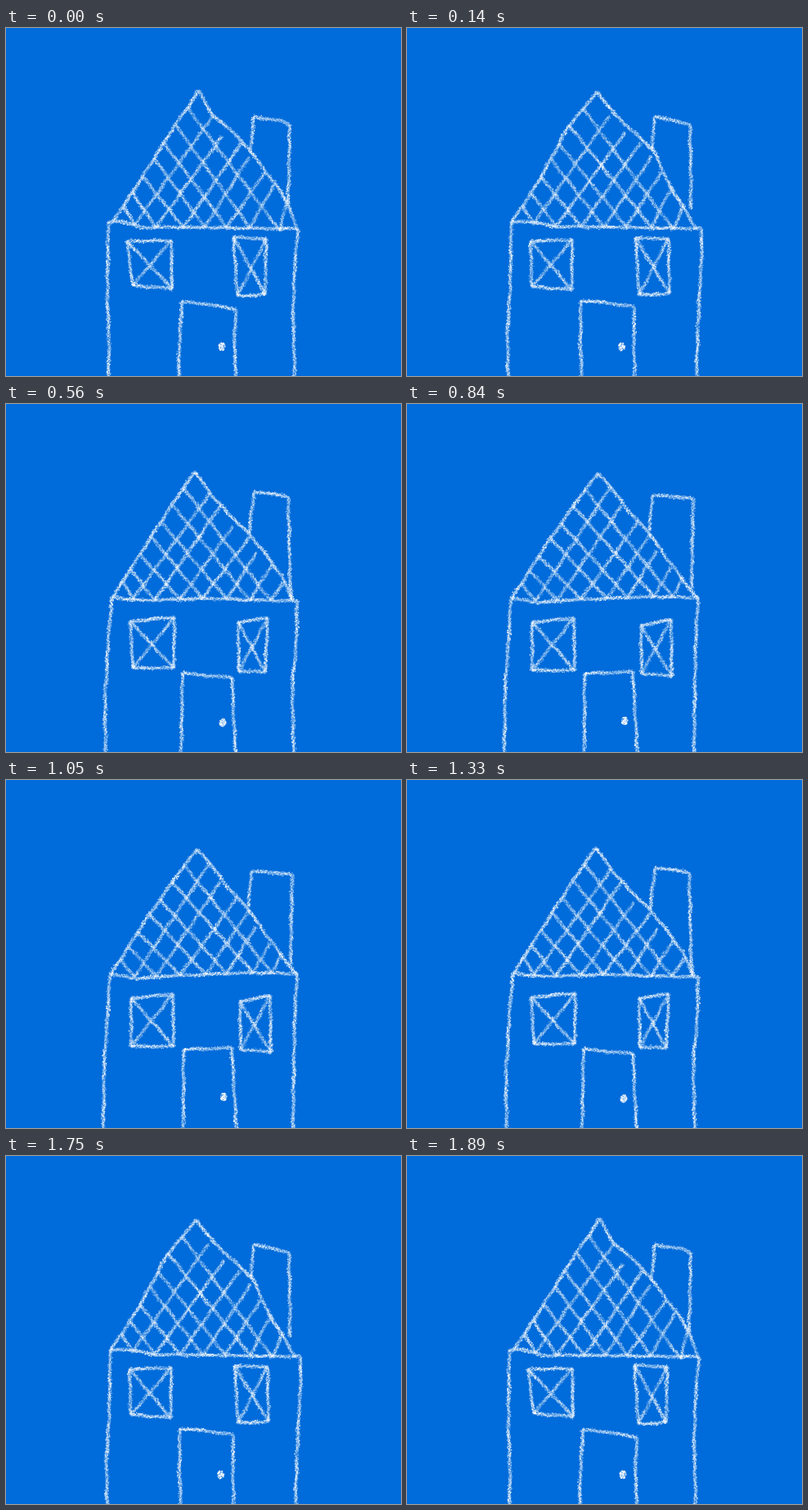
Recreate the animation shown at these times as an HTML page with a canvas. Size 483 by 426 pixels, loop 1960 ms.

```html
<!DOCTYPE html>
<html lang="en">
<head>
<meta charset="utf-8">
<title>Chalk house</title>
<style>
  html, body { margin: 0; width: 100%; height: 100%; overflow: hidden; background: #006bda; }
  canvas { display: block; }
</style>
</head>
<body>
<canvas id="stage" width="483" height="426"></canvas>
<script>
const W = 483, H = 426, STEP = 140, LOOP = 1960, TURN = 1015;

// Four key drawings; each part is a polyline of "x,y" points.
// tips: upper ends of the "/" tile lines; nodes: where tile lines meet the eaves.
const keys = [
  {
    left: '236,77 206,120 160,193 131,236',
    right: '236,77 253,108 270,120 296,147 336,200 345,217 357,248',
    base: '125,238 140,236 165,244 240,244 300,245 356,246',
    wallL: '125,238 124,330 126,380 125,430',
    wallR: '357,247 353,290 351,345 353,430',
    chimney: '299,150 303,109 335,113 347,119 345,215',
    winL: '148,261 202,260 203,319 155,315',
    winR: '278,256 318,258 317,326 283,328',
    door: '211,430 212,390 215,335 245,338 281,344 279,390 282,430',
    knob: '264,390',
    tips: '253,108 264,133 288,141 297,158 316,177 328,192 343,212',
    nodes: '335,248 298,244 270,244 243,244 217,244 183,244 157,241'
  },
  {
    left: '232,81 195,122 160,183 128,238',
    right: '232,82 254,99 267,115 303,155 318,180 333,210 353,242',
    base: '127,238 160,239 180,240 240,243 300,244 361,244',
    wallL: '128,238 127,290 122,350 123,430',
    wallR: '361,245 362,260 358,340 354,430',
    chimney: '300,152 302,109 325,113 346,119 348,236',
    winL: '152,261 202,257 201,324 152,320',
    winR: '280,260 320,257 322,322 284,324',
    door: '215,430 212,390 212,331 240,331 277,335 277,390 278,430',
    knob: '262,391',
    tips: '246,107 267,117 285,139 300,155 309,178 323,198 338,225',
    nodes: '323,243 299,243 268,243 240,242 212,241 182,240 154,238'
  },
  {
    left: '231,83 205,120 165,182 131,236',
    right: '231,83 250,110 275,137 300,162 320,187 338,212 351,240',
    base: '130,236 155,240 185,240 240,238 300,240 356,241',
    wallL: '130,236 126,275 121,360 122,430',
    wallR: '356,241 355,290 350,345 352,430',
    chimney: '297,158 303,108 330,110 345,114 348,239',
    winL: '152,266 206,261 205,323 155,323',
    winR: '284,267 320,262 317,328 285,327',
    door: '214,430 215,380 216,329 240,332 277,335 278,380 281,430',
    knob: '265,390',
    tips: '250,109 262,125 277,150 298,163 306,182 325,197 340,218',
    nodes: '323,240 298,240 270,239 240,238 213,239 182,240 156,238'
  },
  {
    left: '233,85 205,122 165,180 128,238',
    right: '233,85 248,100 270,130 298,160 315,185 335,212 354,237',
    base: '128,238 160,243 200,240 245,238 300,236 356,237',
    wallL: '127,238 124,290 120,350 119,430',
    wallR: '356,237 353,290 352,345 351,430',
    chimney: '296,155 300,112 325,113 350,116 348,226',
    winL: '153,267 204,262 205,326 153,326',
    winR: '286,271 323,264 324,333 287,330',
    door: '217,430 217,380 217,330 245,329 276,328 279,380 282,430',
    knob: '266,388',
    tips: '248,103 262,125 283,143 297,160 305,180 322,200 337,213',
    nodes: '325,236 302,236 270,237 244,238 213,239 184,240 157,241'
  }
].map(key => mapParts(key, s => s.split(' ').map(p => p.split(',').map(Number))));

function mapParts(shape, fn) {
  return Object.fromEntries(Object.entries(shape).map(([name, v]) => [name, fn(v, name)]));
}

function mix(a, b, kx, ky) {
  return mapParts(a, (pts, name) => pts.map(([x, y], i) => {
    const [u, v] = b[name][i];
    return [x + (u - x) * kx, y + (v - y) * ky];
  }));
}

function randomFrom(seed) {
  return () => (seed = (seed * 16807) % 2147483647) / 2147483647;
}

function pointAtY(line, y) {
  let i = 1;
  while (i < line.length - 1 && line[i][1] < y) i++;
  const [x0, y0] = line[i - 1], [x1, y1] = line[i];
  return [x0 + (x1 - x0) * (y - y0) / (y1 - y0), y];
}

function drawHouse(shape, seed) {
  const canvas = document.createElement('canvas');
  canvas.width = W;
  canvas.height = H;
  const g = canvas.getContext('2d'), rnd = randomFrom(seed);
  g.fillStyle = '#006bda';
  g.fillRect(0, 0, W, H);
  g.fillStyle = g.strokeStyle = '#fff';
  g.lineCap = g.lineJoin = 'round';

  function grain(x, y, alpha) {
    const size = 0.7 + rnd() * 0.8;
    g.globalAlpha = alpha * rnd();
    g.fillRect(x - size / 2, y - size / 2, size, size);
  }

  function chalk(pts, pressure = 1) {
    const phase = rnd() * 6;
    let travelled = 0;
    g.globalAlpha = 0.16 * pressure;
    g.lineWidth = 3.6;
    g.beginPath();
    pts.forEach(p => g.lineTo(...p));
    g.stroke();
    for (let i = 1; i < pts.length; i++) {
      const [x0, y0] = pts[i - 1], [x1, y1] = pts[i];
      const len = Math.hypot(x1 - x0, y1 - y0), dx = (x1 - x0) / len, dy = (y1 - y0) / len;
      for (let d = 0; d < len; d += 0.2) {
        const s = travelled + d;
        const off = (rnd() + rnd() - 1) * 3 + 0.5 * Math.sin(s / 6 + phase);
        const force = 0.78 + 0.17 * Math.sin(s / 11 + phase);
        grain(x0 + dx * d - dy * off, y0 + dy * d + dx * off, force * pressure);
      }
      travelled += len;
    }
  }

  function frame([a, b, c, d]) {
    chalk([a, b, c, d, a]);
    chalk([a, c], 0.85);
    chalk([b, d], 0.7);
  }

  const { left, tips, nodes } = shape;
  const top = left[0][1], drop = left[left.length - 1][1] - top;
  [0.13, 0.26, 0.4, 0.52, 0.66, 0.78, 0.88].forEach((f, i) => {
    chalk([pointAtY(left, top + drop * f), nodes[i]], 0.65 + rnd() * 0.25);
    chalk([tips[i], nodes[6 - i]], 0.65 + rnd() * 0.25);
  });
  ['left', 'right', 'base', 'wallL', 'wallR', 'chimney', 'door'].forEach(name => chalk(shape[name]));
  frame(shape.winL);
  frame(shape.winR);

  const [kx, ky] = shape.knob[0];
  for (let i = 0; i < 150; i++) {
    const a = rnd() * 2 * Math.PI, r = Math.sqrt(rnd());
    grain(kx + 4.2 * r * Math.cos(a), ky + 5 * r * Math.sin(a), 1);
  }
  return canvas;
}

const [a, b, c, d] = keys;
const poses = [
  a, mix(a, b, 0.8, 0.3),
  b, mix(b, c, 0.2, 0.8),
  c, mix(c, d, 0.6, 0.9),
  d, mix(d, b, 0.5, 0.6)
].map((shape, i) => drawHouse(shape, 7919 * (i + 1)));

const stage = document.getElementById('stage').getContext('2d');

// Steps forward through the poses, then back again.
function poseAt(t) {
  return t < TURN ? Math.floor(t / STEP) : Math.ceil((2 * TURN - t) / STEP) - 1;
}

function tick() {
  stage.drawImage(poses[poseAt(performance.now() % LOOP)], 0, 0);
  requestAnimationFrame(tick);
}
tick();
</script>
</body>
</html>
```
